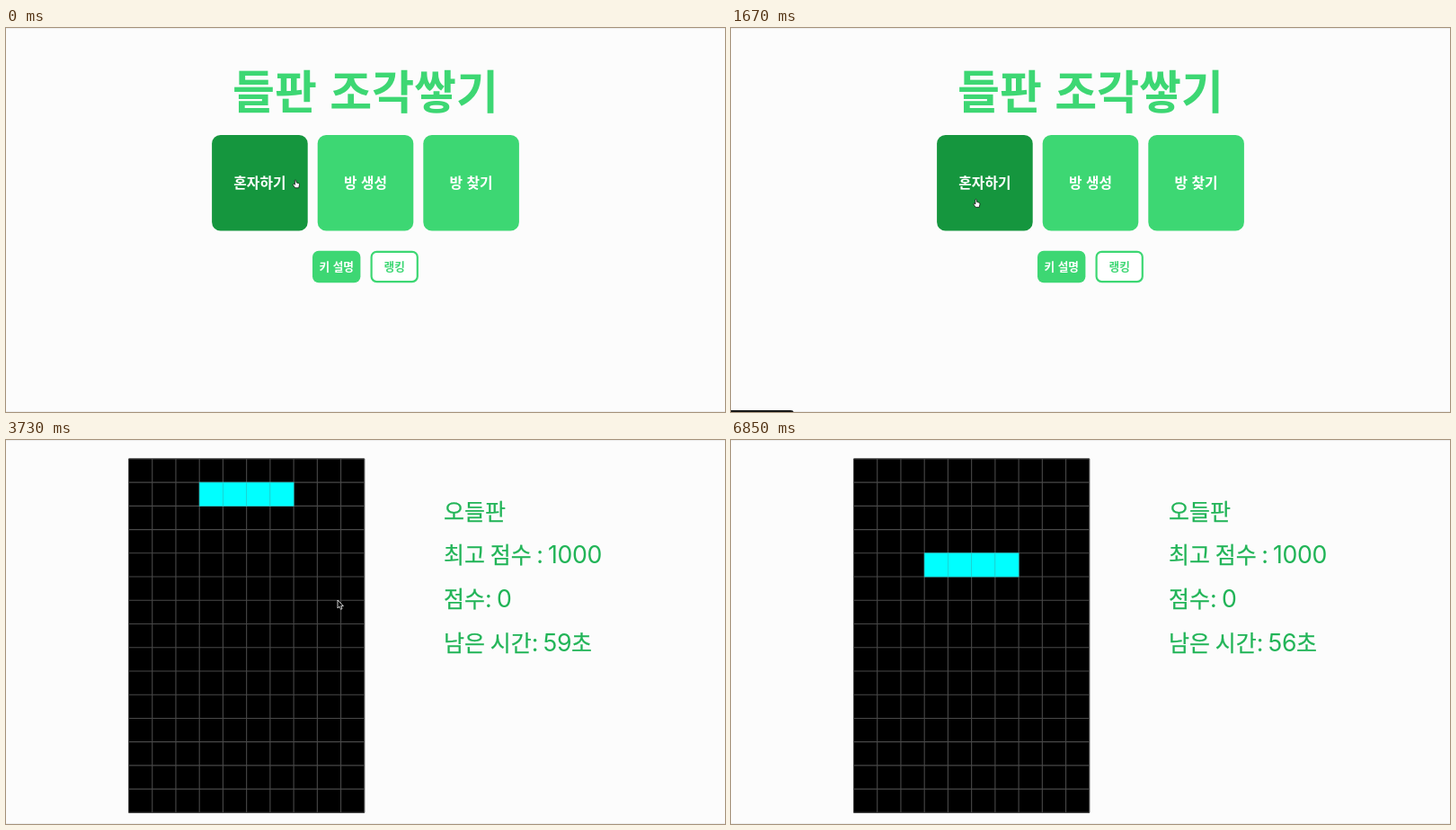
An HTML page for the animation above (6880 ms loop, 800 by 427 pixels).

```html
<!DOCTYPE html>
<html lang="ko">
<head>
<meta charset="utf-8">
<style>
  html, body { margin: 0; width: 100%; height: 100%; overflow: hidden; background: #fcfcfc; }
  svg { position: absolute; left: 0; top: 0; }
  svg text { font-family: "Noto Sans CJK KR", "Noto Sans CJK", sans-serif; font-weight: 700; text-anchor: middle; fill: #fff; }
  svg .green { fill: #3dd773; }
  #info {
    position: absolute; left: 487px; top: 54.5px; color: #21b457; white-space: pre;
    font: 400 26.67px/48.8px Inter, "Noto Sans CJK KR", sans-serif;
    letter-spacing: -.4px; word-spacing: -1.5px;
  }
  #info b {
    font: 500 25px/0 "Noto Sans CJK KR", "Noto Sans CJK", sans-serif;
    letter-spacing: 0; -webkit-text-stroke: .25px;
  }
</style>
</head>
<body>
<svg width="800" height="427" viewBox="0 0 800 427">
  <path d="M0 .5H800M0 426.5H800" stroke="#eee"/>
  <g id="menu">
    <text class="green" x="400" y="89.5" font-size="51">들판 조각쌓기</text>
    <g id="buttons"></g>
  </g>
  <g id="game">
    <rect id="board"/>
    <path id="grid" fill="none" stroke="#484848" stroke-width="1.1"/>
    <g id="piece" fill="#0ff" stroke="#1fd0d0" stroke-width=".7"></g>
  </g>
  <path id="status" d="M0 425H66Q69.500 425 69.500 427H0Z" fill="#161616"/>
  <g id="cursor">
    <path id="arrow" d="M0 0V9L2 7.200L3.500 10.300L5 9.600L3.700 6.600H6.400Z" stroke="#fff" stroke-width=".8"/>
    <path id="hand" transform="scale(.88)" d="M-.800 .400Q0 -.600 .800 .400L1.300 3.300L4.400 4.300Q5.400 4.800 5 6.500L4.200 10H-.300L-3 6.300Q-3.300 5 -1.800 5.200L-.600 6Z" fill="#fff" stroke="#111" stroke-width=".9"/>
  </g>
</svg>
<div id="info"></div>
<script>
const LOOP = 6880, GAME_START = 2120, FIRST_TICK = 2330, TICK = 1000, CURSOR_HIDE = 5100;
const CELL = 26.23, COLS = 10, ROWS = 15, LEFT = 136.5, TOP = 20.9;
const FADE = 150, FADE_STEPS = 15;
const $ = id => document.getElementById(id);
const show = (id, on) => { $(id).style.display = on ? '' : 'none'; };
const range = n => [...Array(n).keys()];

// Two centred rows of buttons
const bigButton = (label, i) =>
  ({ label, x: 229.1 + 117.6 * i, y: 119, w: 106.6, h: 106.5, r: 9.5, size: 15.8 });
const smallButton = (label, i) =>
  ({ label, x: 341 + 64.5 * i, y: 247.7, w: 53.4, h: 35.5, r: 7, size: 12.7 });
const buttons = [
  ...['혼자하기', '방 생성', '방 찾기'].map(bigButton),
  ...['키 설명', '랭킹'].map(smallButton)
];
const outlined = buttons[buttons.length - 1];

function buttonMarkup(b) {
  const edge = b === outlined ? 1.1 : 0;
  const paint = edge ? 'fill="#fff" stroke="#3dd773" stroke-width="2.2"' : '';
  return `<rect x="${b.x + edge}" y="${b.y + edge}" width="${b.w - 2 * edge}"
      height="${b.h - 2 * edge}" rx="${b.r - edge}" ${paint}/>
    <text x="${b.x + b.w / 2}" y="${b.y + b.h / 2 + b.size * .36}" font-size="${b.size}"
      class="${edge ? 'green' : ''}">${b.label}</text>`;
}
$('buttons').innerHTML = buttons.map(buttonMarkup).join('');
const faces = $('buttons').querySelectorAll('rect');

const box = (col, w, h) => `x="${LEFT + col * CELL}" width="${w}" height="${h}"`;
$('board').outerHTML = `<rect ${box(0, COLS * CELL, ROWS * CELL)} y="${TOP}"/>`;
$('piece').innerHTML = range(4).map(i => `<rect ${box(3 + i, CELL, CELL)}/>`).join('');
$('grid').setAttribute('d',
  range(COLS + 1).map(c => `M${LEFT + c * CELL} ${TOP}v${ROWS * CELL}`).join('') +
  range(ROWS + 1).map(r => `M${LEFT} ${TOP + r * CELL}h${COLS * CELL}`).join(''));

// Stops of the pointer: time, x, y
const stops = [
  [30, 322, 169], [220, 510, 167], [400, 300, 160], [550, 280.5, 100], [720, 300, 52],
  [1000, 510, 175], [1180, 375, 262], [1440, 330, 52], [1640, 272.5, 190.5],
  [2850, 272.5, 190.5], [3730, 369, 178], [4390, 433, 197]
];

function pointer(t) {
  const next = stops.findIndex(s => s[0] > t);
  if (next <= 0) return stops.at(next).slice(1);
  const [t0, ...from] = stops[next - 1], [t1, ...to] = stops[next];
  const k = (t - t0) / (t1 - t0), s = k * k * (3 - 2 * k);
  return from.map((v, i) => v + (to[i] - v) * s);
}

const inside = ([px, py], { x, y, w, h }) => px >= x && px <= x + w && py >= y && py <= y + h;
const easeOut = k => 1 - (1 - k) ** 2.2;

// Hover colour follows the pointer's recent past through an eased fade.
const hover = (t, button) => range(FADE_STEPS).reduce((sum, i) =>
  inside(pointer(t - i * FADE / FADE_STEPS), button)
    ? sum + easeOut((i + 1) / FADE_STEPS) - easeOut(i / FADE_STEPS)
    : sum, 0);

function drawMenu(t) {
  buttons.forEach((b, i) => {
    if (b === outlined) return;
    faces[i].style.fill = `color-mix(in srgb, #15963e ${hover(t, b) * 100}%, #3dd773)`;
  });
}

let shown = '';
function drawGame(t) {
  const row = Math.floor((t - FIRST_TICK) / TICK);
  const started = row >= 0;
  show('piece', started);
  $('piece').setAttribute('transform', `translate(0 ${TOP + row * CELL})`);

  const sep = started ? ': ' : ' : ';
  const left = started ? 60 - row : '00';
  const text = `오들판\n최고 점수 : 1000\n점수${sep}0\n남은 시간${sep}${left}초`;
  if (text === shown) return;
  shown = text;
  $('info').innerHTML = text.replace(/[가-힣]+/g, '<b>$&</b>');
}

function draw(t) {
  const playing = t >= GAME_START;
  const at = pointer(t);
  show('menu', !playing);
  show('game', playing);
  show('info', playing);
  show('status', t >= 300 && t < 2500);
  (playing ? drawGame : drawMenu)(t);

  const over = !playing && buttons.some(b => inside(at, b));
  show('hand', over);
  show('arrow', !over);
  show('cursor', t < CURSOR_HIDE);
  $('cursor').setAttribute('transform', `translate(${at})`);
}

const start = performance.now();
function frame() {
  draw((performance.now() - start) % LOOP);
  requestAnimationFrame(frame);
}
frame();
</script>
</body>
</html>
```
